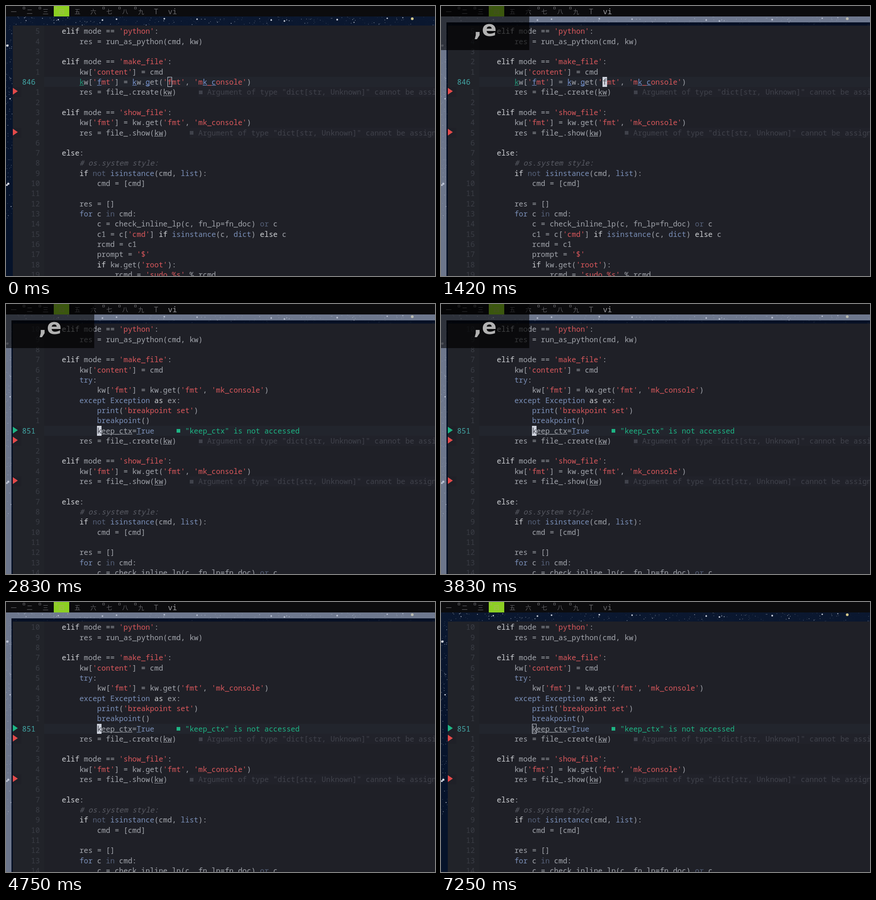
Recreate the animation shown at these times as an HTML page with a canvas. Size 943x594 px, loop 7330 ms.

```html
<!DOCTYPE html>
<html lang="en">
<head>
<meta charset="utf-8">
<title>Editor session</title>
<style>
html, body { margin: 0; width: 100%; height: 100%; overflow: hidden; background: #0c0c0e; }
canvas { display: block; }
</style>
</head>
<body>
<canvas id="stage" width="943" height="594"></canvas>
<script>
const W = 943, H = 594, LOOP = 7330;
const ctx = document.getElementById('stage').getContext('2d');

// Text grid
const CW = 9.68, LH = 22.33, X0 = 84, Y0 = 44.4;
const MONO = '16.13px "Noto Sans Mono", "DejaVu Sans Mono", monospace';
const CJK = '13px "Noto Sans CJK SC", "Noto Sans CJK JP", sans-serif';

const C = {
  bg: '#1f2027', gutter: '#212329', row: '#22252d', num: '#3a3d45', current: '#43a9a8',
  text: '#a3a6ad', bright: '#d0d2d6', blue: '#7b90b9', dim: '#56617a', str: '#db585c',
  comment: '#5a5c65', error: '#40424b', hint: '#1db584', red: '#e34a4a', jump: '#7894cf',
  teal: '#239879', cursor: '#ced2dc'
};

// Moments, in ms
const T = { focus: 420, comma: 1170, e: 1330, insert: 1670, hint: 2580, hide: 3920, blur: 4830 };

const ERR = 'Argument of type "dict[str, Unknown]" cannot be assigned to parameter';
const HEAD = [
  "    elif mode == 'python':",
  '        res = run_as_python(cmd, kw)',
  '',
  "    elif mode == 'make_file':",
  "        kw['content'] = cmd"
];
const GET = "        kw['fmt'] = kw.get('fmt', 'mk_console')";
const TRY = [
  '        try:',
  '    ' + GET,
  '        except Exception as ex:',
  "            print('breakpoint set')",
  '            breakpoint()',
  '            keep_ctx=True'
];
const TAIL = [
  '        res = file_.create(kw)',
  '',
  "    elif mode == 'show_file':",
  GET,
  '        res = file_.show(kw)',
  '',
  '    else:',
  '        # os.system style:',
  '        if not isinstance(cmd, list):',
  '            cmd = [cmd]',
  '',
  '        res = []',
  '        for c in cmd:',
  '            c = check_inline_lp(c, fn_lp=fn_doc) or c',
  "            c1 = c['cmd'] if isinstance(c, dict) else c",
  '            rcmd = c1',
  "            prompt = '$'",
  "            if kw.get('root'):",
  "                rcmd = 'sudo %s' % rcmd"
];
const BEFORE = [...HEAD, GET, ...TAIL];
const AFTER = [...HEAD, ...TRY, ...TAIL];

const WORDS = {};
const paint = (color, words) => words.split(' ').forEach(w => WORDS[w] = color);
paint(C.bright, 'elif else if as');
paint(C.blue, 'isinstance list dict for try except Exception print breakpoint True');
paint(C.dim, 'not in or');

const colX = c => X0 + c * CW;
const rowY = r => Y0 + r * LH;

function rect(x, y, w, h, color) {
  ctx.fillStyle = color;
  ctx.fillRect(x, y, w, h);
}

function put(str, col, row, color, italic) {
  ctx.font = (italic ? 'italic ' : '') + MONO;
  ctx.textAlign = 'left';
  ctx.fillStyle = color;
  for (let i = 0; i < str.length; i++) {
    if (str[i] !== ' ') ctx.fillText(str[i], colX(col + i), rowY(row) + 16.8);
  }
}

function underline(col, row, n, color) {
  rect(colX(col), Math.round(rowY(row) + 18.2), n * CW, 1, color);
}

function codeLine(line, row) {
  for (const m of line.matchAll(/#.*|'[^']*'|\w+|[^\s\w'#]+/g)) {
    const s = m[0], note = s[0] === '#';
    const color = note ? C.comment : s[0] === "'" ? C.str : WORDS[s] || C.text;
    put(s, m.index, row, color, note);
  }
}

function sign(row, color) {
  const y = Math.round(rowY(row));
  rect(15, y, 19, 22, C.bg);
  ctx.fillStyle = color;
  ctx.beginPath();
  ctx.moveTo(15, y + 2);
  ctx.lineTo(26, y + 9.5);
  ctx.lineTo(15, y + 17);
  ctx.fill();
}

function diagnostic(row, len, str, color) {
  const col = len + 5;
  if (color === C.error) rect(colX(col), Math.round(rowY(row)), W, 22, '#21222a');
  rect(Math.round(colX(col) + 1), Math.round(rowY(row) + 7.5), 8, 8, color);
  put(str, col + 2, row, color);
}

// Repaints one cell as a jump target
function mark(line, col, row, color) {
  rect(colX(col), rowY(row) + 2, CW, 19, C.row);
  put(line[col], col, row, color);
  underline(col, row, 1, color);
}

function cursor(line, col, row, solid) {
  const x = Math.round(colX(col)), y = Math.round(rowY(row));
  if (solid) {
    rect(x, y, 10, 22, C.cursor);
    put(line[col], col, row, '#4a4c55');
  } else {
    ctx.strokeStyle = C.cursor;
    ctx.lineWidth = 1;
    ctx.strokeRect(x + 0.5, y + 0.5, 9, 21);
  }
}

function editor(t, focus) {
  const done = t >= T.insert, hint = t >= T.hint;
  const lines = done ? AFTER : BEFORE;
  const cur = done ? 10 : 5;
  rect(15, 43, W, H, C.bg);
  rect(15, 43, 69, H, C.gutter);
  rect(84, Math.round(rowY(cur)), W, 22, C.row);

  lines.slice(0, 25).forEach((line, r) => {
    if (r === cur) put(done ? '851' : '846', -5, r, C.current);
    else {
      const n = String(Math.abs(r - cur));
      put(n, -1 - n.length, r, C.num);
    }
    if (/file_\./.test(line)) {
      sign(r, C.red);
      diagnostic(r, line.length, ERR, C.error);
      underline(line.length - 3, r, 2, C.text);
    }
    codeLine(line, r);
  });

  const line = lines[cur];
  if (done) {
    if (hint) {
      sign(cur, C.hint);
      diagnostic(cur, line.length, '"keep_ctx" is not accessed', C.hint);
      underline(12, cur, 8, C.text);
    } else mark(line, 17, cur, C.jump);
    mark(line, 21, cur, C.blue);
  } else {
    mark(line, 8, cur, C.teal);
    [12, 20, 23, 36, 38].forEach(c => mark(line, c, cur, C.jump));
  }
  cursor(line, done ? 12 : 28, cur, focus);
}

// Seeded stars along the visible edges
let seed = 11;
const rnd = () => (seed = seed * 16807 % 2147483647) / 2147483647;
const stars = [[3, 87, 2.6], [5, 391, 2.5], [9, 204, 1.6], [2, 394, 2], [115, 30, 1.5], [212, 31, 1.8],
  [243, 29, 1.8], [348, 28, 1.8], [420, 29, 1.7], [583, 31, 1.8], [612, 33, 1.8], [728, 30, 1.9], [838, 27, 1.6]]
  .map(([x, y, r]) => ({ x, y, r, a: 0.95 }));
for (let i = 0; i < 300; i++) {
  const side = i % 3 === 0;
  stars.push({
    x: side ? rnd() * 14 : rnd() * W,
    y: side ? 40 + Math.pow(rnd(), 1.3) * 430 : 24 + rnd() * 18,
    r: 0.4 + rnd() * rnd() * 0.9,
    a: 0.2 + rnd() * 0.65
  });
}

function dot(x, y, r, color) {
  ctx.fillStyle = color;
  ctx.beginPath();
  ctx.arc(x, y, r, 0, 7);
  ctx.fill();
}

function wallpaper(focus) {
  const g = ctx.createLinearGradient(0, 0, 0, H);
  g.addColorStop(0, '#0b1830');
  g.addColorStop(0.4, '#07142c');
  g.addColorStop(1, '#06132a');
  rect(0, 0, W, H, g);
  for (const s of stars) dot(s.x, s.y, s.r, `rgba(225,230,240,${s.a})`);
  dot(893, 28, 3, '#d5c98a');
  if (focus) {
    const tint = 'rgba(172,180,200,0.62)';
    rect(0, 23, W, 13, tint);
    rect(0, 36, 12, H, tint);
    rect(12, 36, W, 7, 'rgba(4,14,34,0.75)');
    rect(12, 36, 3, H, 'rgba(4,14,34,0.75)');
  }
}

function bar(focus) {
  rect(0, 0, W, 23, '#0c0c0e');
  rect(105, 0, 34, 23, '#8ccf22');
  ctx.textAlign = 'center';
  ctx.font = CJK;
  ctx.lineWidth = 1;
  [...'一二三四五六七八九'].forEach((ch, i) => {
    const x = 17 + 35 * i, on = i === 3;
    const color = on ? '#a6b85a' : '#626266';
    ctx.fillStyle = ctx.strokeStyle = color;
    ctx.fillText(ch, x, 17);
    if ([1, 2, 3, 6, 7, 8].includes(i)) ctx.strokeRect(x - 14.5, 2.5, 4, 4);
  });
  ctx.font = '16.5px "Noto Sans Mono", "DejaVu Sans Mono", monospace';
  ctx.fillStyle = '#626266';
  ctx.fillText('T', 330, 17.5);
  ctx.fillStyle = focus ? '#a2a2a6' : '#69696d';
  ctx.fillText('vi', 366, 17.5);
}

function keys(t) {
  if (t < T.comma || t >= T.hide) return;
  rect(0, 0, 194, 97, 'rgba(0,0,0,0.58)');
  rect(12, 36, 182, 61, 'rgba(0,0,0,0.25)');
  ctx.font = 'bold 48px "DejaVu Sans", sans-serif';
  ctx.textAlign = 'center';
  ctx.fillStyle = '#b2b2b2';
  ctx.fillText(t < T.e ? ',' : ',e', 97, 66);
}

function draw(t) {
  const focus = t >= T.focus && t < T.blur;
  wallpaper(focus);
  editor(t, focus);
  bar(focus);
  keys(t);
}

const start = performance.now();
function tick(now) {
  draw(Math.max(0, now - start) % LOOP);
  requestAnimationFrame(tick);
}
draw(0);
requestAnimationFrame(tick);
</script>
</body>
</html>
```
